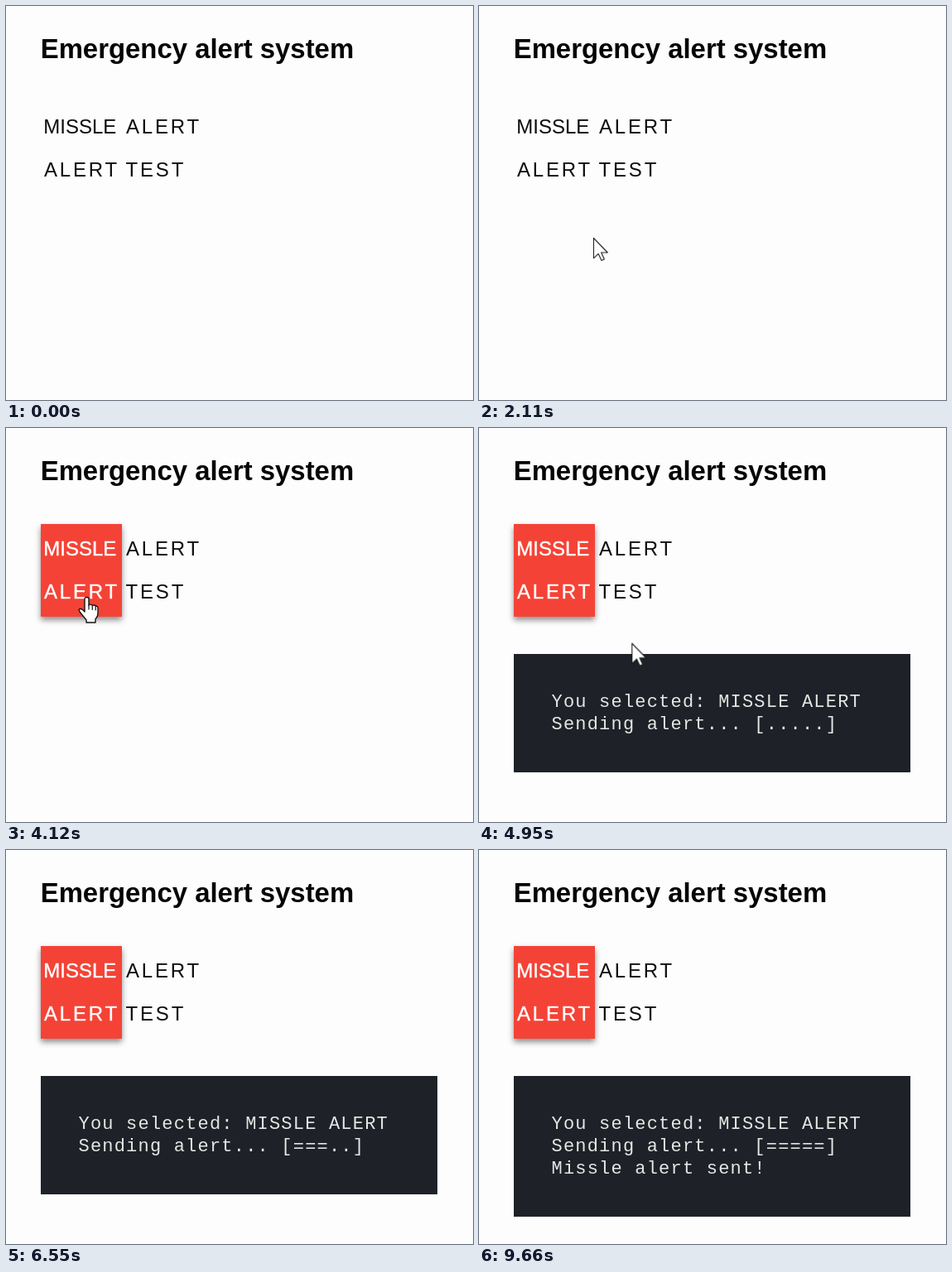
These frames come from a looping animation (564 by 476 pixels, 9840 ms). An HTML page:

```html
<!DOCTYPE html>
<html lang="en">
<head>
<meta charset="utf-8">
<title>Emergency alert system</title>
<style>
  html, body { margin: 0; width: 100%; height: 100%; overflow: hidden; background: #fdfdfe; }
  #stage { position: relative; width: 564px; height: 476px; overflow: hidden; background: #fdfdfe; }
  svg { position: absolute; left: 0; top: 0; overflow: visible; }
  text { font: 24px "Liberation Sans", Arial, sans-serif; fill: #0c0c0e; white-space: pre; }
  .title { font-size: 32.9px; font-weight: bold; fill: #050506; }
  .wide { letter-spacing: 2.8px; }

  /* One shared clock: every state is a percentage of the same loop */
  .button, .picked, .panel, .dots, .fill, .sent, .arrow, .hand, .beam {
    animation: 9840ms step-end infinite;
  }

  .button {
    position: absolute; left: 42px; top: 116px; width: 97.5px; height: 112px;
    background: #f44336; box-shadow: 0 4px 7px rgba(0, 0, 0, .45);
    animation-name: select;
  }
  .picked { stroke-width: .4px; animation-name: lighten; }

  .panel {
    position: absolute; left: 42px; top: 273px; width: 388.5px; height: 54px;
    padding: 45px 45px 44px 45.5px; margin: 0; background: #1f2128; color: #e4e7e4;
    font: 22px/27px "Liberation Mono", "Courier New", monospace;
    letter-spacing: 1.2px; white-space: pre;
    animation-name: panel;
  }
  .bar { position: relative; }
  .bar i { font-style: normal; display: inline-block; vertical-align: top; }
  .dots { animation-name: dots; }
  .bar .fill { position: absolute; left: 0; top: 0; animation-name: fill; }
  .sent { animation-name: sent; }

  @keyframes select { 0% { visibility: hidden; } 41.46%, 100% { visibility: visible; } }
  @keyframes lighten {
    0% { fill: #0c0c0e; stroke: transparent; }
    41.46%, 100% { fill: #fff; stroke: #fff; }
  }
  @keyframes panel {
    0% { visibility: hidden; height: 54px; }
    45.73% { visibility: visible; height: 54px; }
    73.17%, 100% { visibility: visible; height: 81px; }
  }
  @keyframes sent { 0% { opacity: 0; } 73.17%, 100% { opacity: 1; } }
  @keyframes dots {
    0% { clip-path: inset(0); }
    57.93% { clip-path: inset(0 0 0 20%); }
    60.98% { clip-path: inset(0 0 0 40%); }
    64.02% { clip-path: inset(0 0 0 60%); }
    67.07% { clip-path: inset(0 0 0 80%); }
    70.12%, 100% { clip-path: inset(0 0 0 100%); }
  }
  @keyframes fill {
    0% { clip-path: inset(0 100% 0 0); }
    57.93% { clip-path: inset(0 80% 0 0); }
    60.98% { clip-path: inset(0 60% 0 0); }
    64.02% { clip-path: inset(0 40% 0 0); }
    67.07% { clip-path: inset(0 20% 0 0); }
    70.12%, 100% { clip-path: inset(0); }
  }

  .cursor { animation: travel 9840ms linear infinite; }
  .cursor path { stroke-linejoin: round; stroke-linecap: round; }
  .arrow { animation-name: arrow; }
  .hand { animation-name: hand; }
  .beam { animation-name: beam; }

  @keyframes travel {
    0%, 11.69% { transform: translate(440px, 490px); }
    16.26% { transform: translate(300px, 398px); }
    19.82% { transform: translate(195px, 320px); }
    21.44% { transform: translate(138px, 280px); }
    25.41% { transform: translate(108px, 230px); animation-timing-function: ease-out; }
    29.47%, 42.68% { transform: translate(97px, 204px); animation-timing-function: ease-in; }
    50.3% { transform: translate(184px, 259.5px); }
    57.22% { transform: translate(322px, 336px); }
    60.47% { transform: translate(368px, 400px); }
    63.52%, 100% { transform: translate(410px, 490px); }
  }
  @keyframes arrow {
    0% { opacity: 1; }
    25.7% { opacity: 0; }
    47.4% { opacity: 1; }
    55.6% { opacity: 0; }
    59.05%, 100% { opacity: 1; }
  }
  @keyframes hand { 0% { opacity: 0; } 25.7% { opacity: 1; } 47.4%, 100% { opacity: 0; } }
  @keyframes beam { 0% { opacity: 0; } 55.6% { opacity: 1; } 59.05%, 100% { opacity: 0; } }
</style>
</head>
<body>
<div id="stage">
  <div class="button"></div>

  <svg width="564" height="476">
    <text class="title" x="41.7" y="63">Emergency alert system</text>
    <text class="picked" x="45.3" y="154">MISSLE</text>
    <text class="wide" x="145" y="154">ALERT</text>
    <text class="wide picked" x="46" y="206">ALERT</text>
    <text class="wide" x="144.6" y="206">TEST</text>
  </svg>

  <pre class="panel">You selected: MISSLE ALERT
Sending alert... [<span class="bar"><i class="dots">.....</i><i class="fill">=====</i></span>]
<span class="sent">Missle alert sent!</span></pre>

  <svg width="564" height="476">
    <g class="cursor">
      <path class="arrow" fill="#fff" stroke="#1c1c1e" stroke-width="1.1"
        d="M.5 .5V24.8L6.2 19.4 10 27.6 13.4 26 9.7 18H17.4Z"/>
      <g class="hand">
        <path fill="#fff" stroke="#141416" stroke-width="1.4"
          d="M-2 2.5Q-2 .5 .5 .5T3 2.5V10Q5 8 7.5 10.5 10 9 11.5 11.5 14 10.5 14 14V20Q14 24 11 27V31H0V28L-8 18Q-10 14.5-7 14.5-5 14.5-2 18Z"/>
        <path fill="none" stroke="#141416" stroke-width="1.2" d="M3 10V15M7.3 11V15.5M11.2 12V16"/>
      </g>
      <path class="beam" fill="none" stroke="#dcdce0" stroke-width="1.8"
        d="M-6.5-12H-2Q0-12 0-10 0-12 2-12H6.5M0-10V10M-6.5 11.5H-2Q0 11.5 0 10 0 11.5 2 11.5H6.5"/>
    </g>
  </svg>
</div>
</body>
</html>
```
